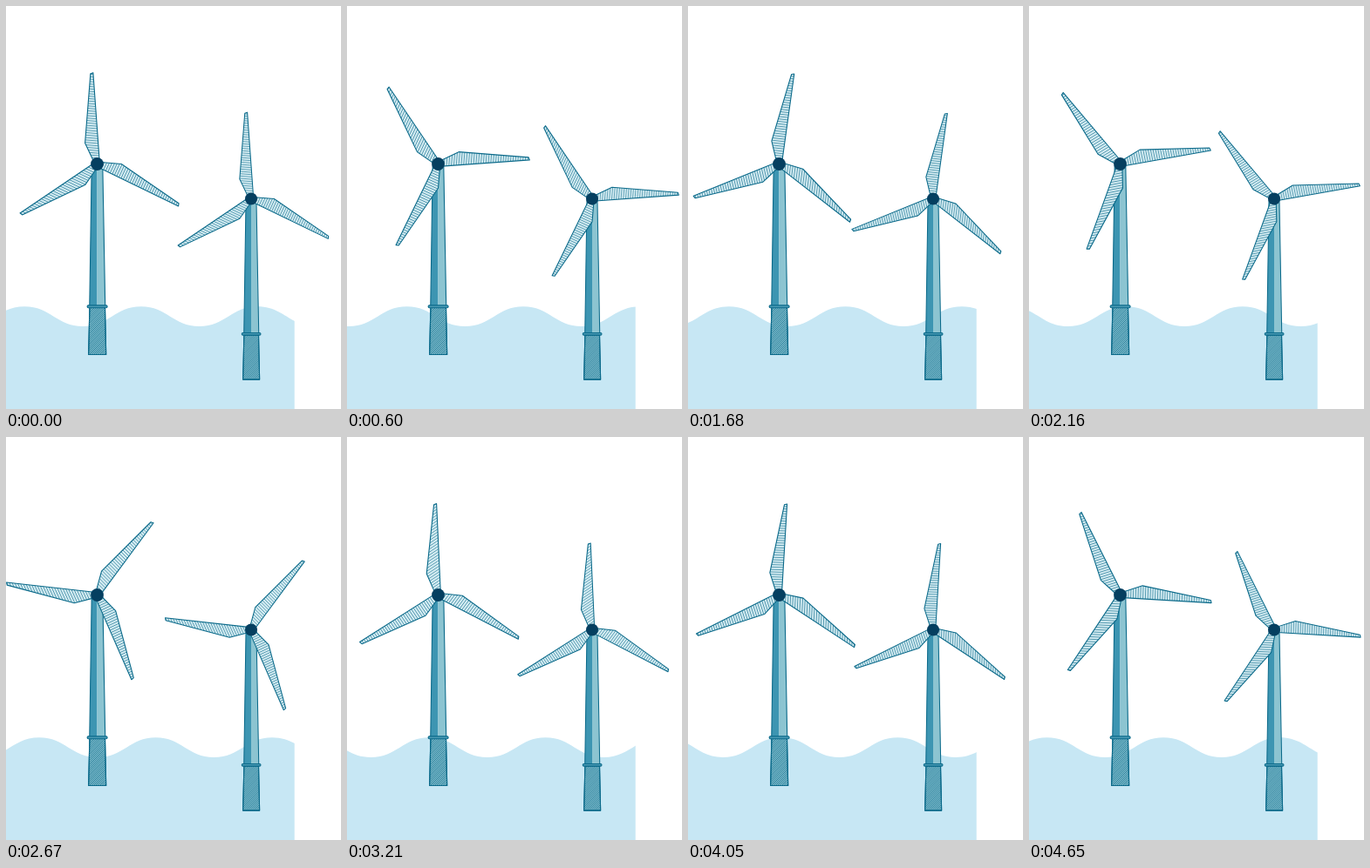
Animation, 384 px wide and 463 px high, one loop 4.68 s. Source, as an HTML page:

```html
<!DOCTYPE html>
<html lang="en">
<head>
<meta charset="utf-8">
<title>Offshore wind turbines</title>
<style>
  html, body { margin: 0; width: 100%; height: 100%; overflow: hidden; background: #fff; }
  svg { display: block; width: 100vw; height: 100vh; }
</style>
</head>
<body>
<svg viewBox="0 0 384 463">
  <defs>
    <clipPath id="seaClip"><rect width="330.7" height="463"/></clipPath>
    <clipPath id="bladeClip"><path d="M-8 -103.6L-5 -104.8L2.6 -4L-4 -3L-14 -24Z"/></clipPath>
    <clipPath id="baseClip"><path d="M-8.6 165H9L10.2 219H-9.9Z"/></clipPath>
    <g id="tower" stroke="#0b6a8a" stroke-width="1.1" stroke-linejoin="round">
      <path d="M-6.3 2H0V163H-8.7Z" fill="#3d95b2" stroke="none"/>
      <path d="M0 2H6.3L9.2 163H0Z" fill="#8cc4d1" stroke="none"/>
      <path d="M-6.3 2H6.3L9.2 163H-8.7Z" fill="none"/>
      <path d="M-8.6 165H9L10.2 219H-9.9Z" fill="#84bfce"/>
      <path id="baseHatch" clip-path="url(#baseClip)" fill="none" stroke-width="0.8"/>
      <path d="M-8.6 165H9L10.2 219H-9.9Z" fill="none"/>
      <rect x="-11.4" y="162.4" width="23" height="2.8" rx="1.4" fill="#4a9ab4"/>
    </g>
  </defs>
  <path id="sea" fill="#c7e7f4" clip-path="url(#seaClip)"/>
  <g id="turbines"></g>
</svg>
<script>
const LOOP = 4680, STEP = 30;
const WAVE = { length: 133.5, top: 345.2, bottom: 368, start: 21.3, speed: 0.1437 };
const SPIN = 0.15, START_ANGLE = 0.2;
const NS = 'http://www.w3.org/2000/svg';
const turbines = document.getElementById('turbines');
const sea = document.getElementById('sea');

function add(parent, tag, attrs) {
  const el = document.createElementNS(NS, tag);
  for (const key in attrs) el.setAttribute(key, attrs[key]);
  return parent.appendChild(el);
}

// Parallel lines across a column, each dropping by `slope` per unit of x.
function hatch(from, to, gap, half, slope) {
  let d = '';
  for (let y = from; y < to; y += gap) {
    d += `M${-half} ${(y - half * slope).toFixed(2)}L${half} ${(y + half * slope).toFixed(2)}`;
  }
  return d;
}

function addBlade(rotor, angle, slope) {
  const blade = add(rotor, 'g', { transform: `rotate(${angle})`, stroke: '#0b6a8a' });
  const outline = 'M-8 -103.6L-5 -104.8L2.6 -4L-4 -3L-14 -24Z';
  add(blade, 'path', { d: outline, fill: '#d6edf3', stroke: 'none' });
  add(blade, 'path', {
    d: hatch(-122, 16, 2.8 * Math.hypot(1, slope), 16, slope),
    'clip-path': 'url(#bladeClip)', fill: 'none', 'stroke-width': 0.6
  });
  add(blade, 'path', { d: outline, fill: 'none', 'stroke-width': 1.1, 'stroke-linejoin': 'round' });
}

function addTurbine(x, y, scale) {
  const group = add(turbines, 'g', { transform: `translate(${x} ${y}) scale(${scale})` });
  add(group, 'use', { href: '#tower' });
  const rotor = add(group, 'g', {});
  addBlade(rotor, 0, 0.08);
  addBlade(rotor, 120, -0.1);
  addBlade(rotor, 240, -0.7);
  add(group, 'circle', { r: 7.4, fill: '#053f60' });
  return rotor;
}

document.getElementById('baseHatch').setAttribute('d', hatch(150, 236, 2.4, 14, -1));
const rotors = [addTurbine(104.5, 181.5, 1), addTurbine(281, 221.5, 0.948)];

function seaPath(t) {
  const { length, top, bottom, start, speed } = WAVE;
  const half = length / 2, handle = half * 0.45;
  let x = (start - speed * t) % length - length;
  let d = `M${x} 463V${top}`;
  for (let y = top; x < 384; x += half) {
    const next = y === top ? bottom : top;
    d += `C${x + handle} ${y} ${x + half - handle} ${next} ${x + half} ${next}`;
    y = next;
  }
  return d + 'V463Z';
}

function draw(t) {
  sea.setAttribute('d', seaPath(t));
  for (const rotor of rotors) rotor.setAttribute('transform', `rotate(${START_ANGLE + SPIN * t})`);
}

let origin = null;
function tick(now) {
  if (origin === null) origin = now;
  draw(Math.floor(((now - origin) % LOOP) / STEP) * STEP);
  requestAnimationFrame(tick);
}
draw(0);
requestAnimationFrame(tick);
</script>
</body>
</html>
```
